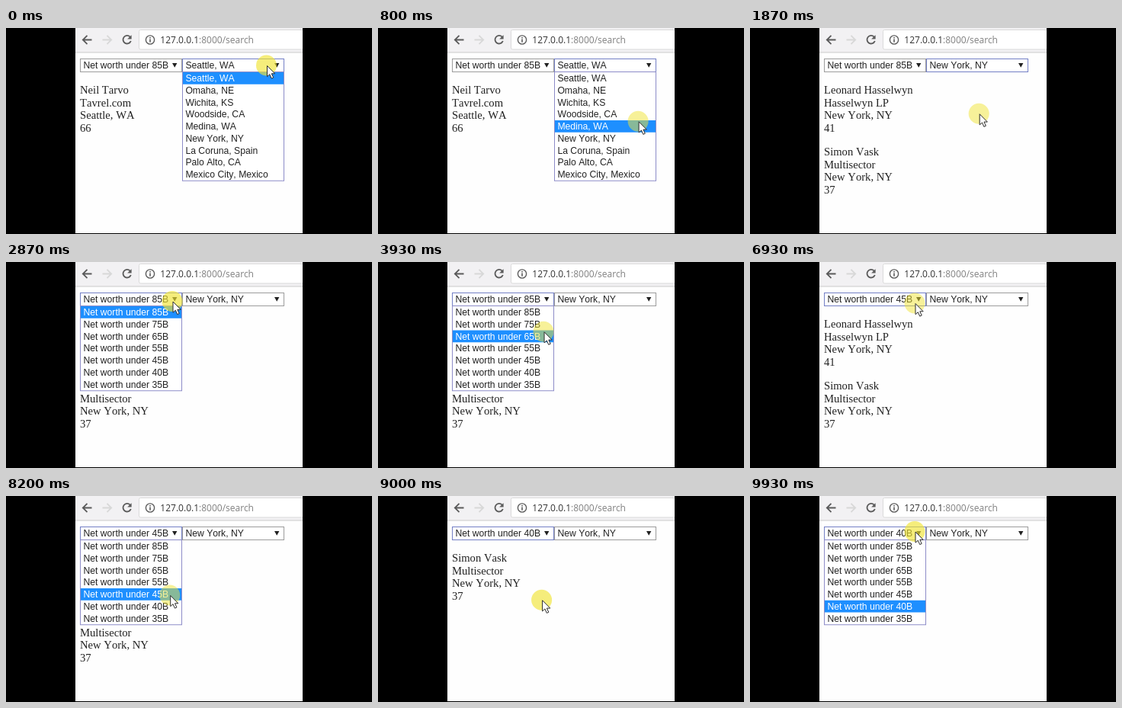
An HTML page for the animation above (9990 ms loop, 480x270 px).

```html
<!DOCTYPE html>
<html lang="en">
<head>
<meta charset="utf-8">
<style>
  html, body { margin: 0; width: 100%; height: 100%; overflow: hidden; background: #000; }
  svg { display: block; width: 480px; height: 270px; }
  text { font-kerning: none; }
  .ui { font: 12.2px "Liberation Sans", Arial, sans-serif; fill: #222; }
  .page { font: 14.65px "Liberation Serif", "Times New Roman", serif; fill: #222; }
  .url { font: 12px "Open Sans", sans-serif; fill: #333; }
  .dim { fill: #808080; }
</style>
</head>
<body>
<svg viewBox="0 0 480 270">
  <rect width="480" height="270"/>
  <rect x="91" width="298" height="269" fill="#fefefe"/>
  <rect x="91" width="298" height="32" fill="#f2f1f3"/>
  <path d="M91 32H389" stroke="#cacaca"/>
  <path d="M389 2.5H176.5Q174.5 2.5 174.5 4.5V26Q174.5 28 176.5 28H389" fill="#fff" stroke="#dadada"/>
  <g fill="none" stroke="#5a5a5a" stroke-width="1.8">
    <path d="M112.5 15.5H101M106.5 9.8L100.8 15.5L106.5 21.2"/>
    <path d="M126.5 15.5H138M132.5 9.8L138.2 15.5L132.5 21.2" stroke="#d8d8d8"/>
    <path d="M162.7 11.6A5.3 5.3 0 1 0 163.8 17"/>
    <circle cx="189" cy="15.5" r="5.6" stroke-width="1.4"/>
    <path d="M189 14.6V18.7M189 11.9V13.4" stroke-width="1.6"/>
  </g>
  <path d="M164.6 9.2V14.6H159.2Z" fill="#5a5a5a"/>
  <text class="url" x="202.3" y="19.8">127.0.0.1<tspan class="dim">:8000/search</tspan></text>
  <g id="results" class="page"></g>
  <g id="menus" class="ui"></g>
  <circle id="halo" r="13.5" fill="#f0e434"/>
  <path id="cursor" d="M0 0V14.2L3.3 11.2L5.7 16.6L8.2 15.5L5.8 10.3H10.2Z" fill="#fff" stroke="#2c2c2c"/>
</svg>
<script>
const LOOP = 9990, FPS = 15, TOP = 58, ROW = 15.75, WIDTH = 133;
const $ = id => document.getElementById(id);
const rowAt = y => Math.floor((y - TOP) / ROW);

function add(parent, tag, attrs, text = '') {
  const el = document.createElementNS('http://www.w3.org/2000/svg', tag);
  for (const k in attrs) el.setAttribute(k, attrs[k]);
  el.textContent = text;
  parent.append(el);
  return el;
}

const limits = [85, 75, 65, 55, 45, 40, 35];
const cities = ['Seattle, WA', 'Omaha, NE', 'Wichita, KS', 'Woodside, CA', 'Medina, WA',
  'New York, NY', 'La Coruna, Spain', 'Palo Alto, CA', 'Mexico City, Mexico'];
const people = [
  ['Neil Tarvo', 'Tavrel.com', 'Seattle, WA', 66],
  ['Leonard Hasselwyn', 'Hasselwyn LP', 'New York, NY', 41],
  ['Simon Vask', 'Multisector', 'New York, NY', 37]
];

// Clicks alternately open a menu and pick the row under the pointer.
const clicks = [
  { at: 0, x: 342.5, y: 49.5 },
  { at: 1400, x: 342, y: 143 },
  { at: 2750, x: 219, y: 52 },
  { at: 5370, x: 217, y: 134.5 },
  { at: 7100, x: 217, y: 54.5 },
  { at: 8810, x: 215.5, y: 143 },
  { at: 9790, x: 217, y: 47 }
];

function makeMenu(x, items) {
  const g = add($('menus'), 'g', { transform: `translate(${x})` });
  const box = add(g, 'rect', { x: .5, y: 40.5, width: WIDTH, height: 17, fill: '#fff' });
  const label = add(g, 'text', { x: 4.4, y: 53.3 });
  add(g, 'path', { d: 'M121 46H127.4L124.2 51.8Z', fill: '#222' });
  const list = add(g, 'g', {});
  add(list, 'rect', { x: .5, y: TOP - .5, width: WIDTH, height: items.length * ROW + 1,
    fill: '#fff', stroke: '#8d8cc8' });
  const bar = add(list, 'rect', { x: 1, width: WIDTH - 1, height: ROW, fill: '#1e8fff' });
  const rows = items.map((s, i) => add(list, 'text', { x: 4.4, y: TOP + 12.1 + i * ROW }, s));
  return { items, box, label, list, bar, rows };
}

const menus = [makeMenu(97, limits.map(n => `Net worth under ${n}B`)), makeMenu(231, cities)];

function drawMenu(m, open, focus, value, tipY) {
  m.label.textContent = m.items[value];
  m.box.setAttribute('stroke', focus ? '#7480c6' : '#9c9c9c');
  m.list.style.display = open ? '' : 'none';
  const over = rowAt(tipY), active = m.items[over] ? over : value;
  m.bar.setAttribute('y', TOP + active * ROW);
  m.rows.forEach((r, i) => r.style.fill = i === active ? '#fff' : '');
}

function drawResults([worth, city]) {
  $('results').replaceChildren();
  people.filter(p => p[2] === cities[city] && p[3] < limits[worth]).forEach((p, i) =>
    p.forEach((s, j) => add($('results'), 'text', { x: 97, y: 86 + i * 81.2 + j * 16.6 }, s)));
}

function stateAt(t) {
  const s = { open: false, focus: 0, values: [0, 0] };
  for (const { at, x, y } of clicks) {
    if (at > t) break;
    if (s.open) s.values[s.focus] = rowAt(y);
    else s.focus = x < 231 ? 0 : 1;
    s.open = !s.open;
    s.since = t - at;
  }
  return s;
}

// Leave shortly after one click, arrive a little before the next.
function pointerAt(t) {
  const n = clicks.findLastIndex(c => c.at <= t);
  const a = clicks[n], b = clicks[n + 1] || a;
  const u = Math.min(1, Math.max(0, (t - a.at - 100) / (b.at - a.at - 400)));
  const e = u * u * (3 - 2 * u);
  return [a.x + (b.x - a.x) * e, a.y + (b.y - a.y) * e];
}

function draw(now) {
  const t = Math.floor((now % LOOP) * FPS / 1000 + .06) * 1000 / FPS;
  const { open, focus, values, since } = stateAt(t);
  const [x, y] = pointerAt(t);
  menus.forEach((m, i) => drawMenu(m, open && focus === i, focus === i, values[i], y));
  drawResults(values);
  $('cursor').setAttribute('transform', `translate(${x} ${y})`);
  $('halo').setAttribute('transform', `translate(${x - 1} ${y - .5})`);
  $('halo').setAttribute('opacity', since < 250 ? .65 : .5);
}

const start = performance.now();
function tick() {
  draw(performance.now() - start);
  requestAnimationFrame(tick);
}
tick();
</script>
</body>
</html>
```
